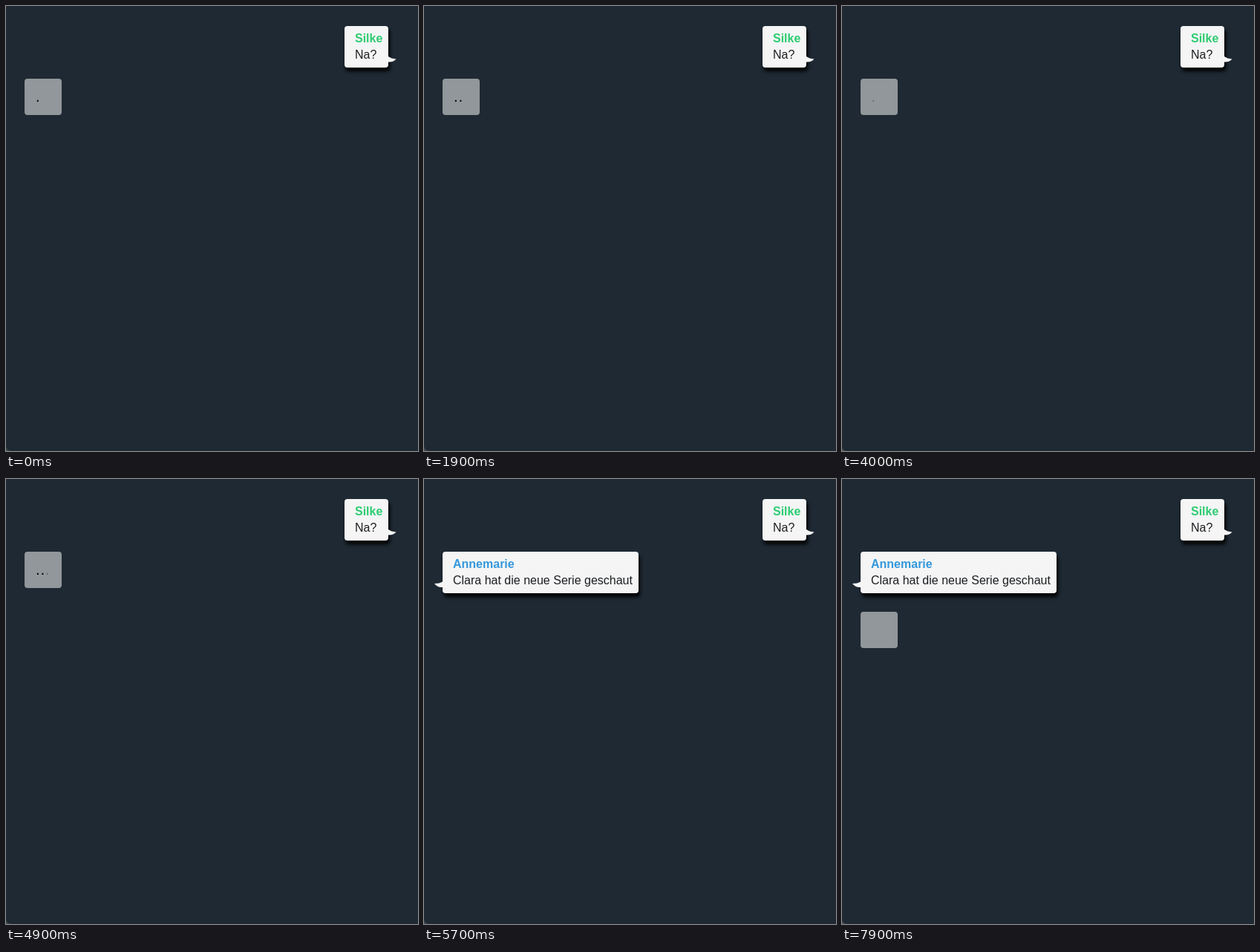
These frames come from a looping animation (555 px wide and 600 px high, 8 s). An HTML page:

```html
<!DOCTYPE html>
<html lang="de">
<meta charset="utf-8">
<title>Chat</title>
<style>
  html, body { margin: 0; width: 100%; height: 100%; overflow: hidden; background: #1e2933; }
  svg { display: block; font: 16px "Liberation Sans", Arial, sans-serif; }
  .box { fill: #f5f5f5; filter: drop-shadow(2px 5px 2.5px #000); }
  .tail { fill: #f5f5f5; }
  .name { font-weight: bold; }
  .text { fill: #1c1e21; }
  .dots { font-size: 20.8px; }
</style>
<svg width="555" height="600" viewBox="0 0 555 600">
  <clipPath id="clip"><rect id="reveal" x="13.6" width="0" height="49"/></clipPath>
  <path d="M0 592Q0 600 8 600H0Z" fill="#41484e"/>

  <g transform="translate(456 27)">
    <rect class="box" width="59" height="56" rx="4"/>
    <path class="tail" d="M59 41Q63 44 69.5 44.5Q66 49 59 48.5Z"/>
    <text class="name" x="14" y="22" fill="#2ecc71">Silke</text>
    <text class="text" x="14" y="44">Na?</text>
  </g>

  <g id="reply" transform="translate(25 98)">
    <rect class="box" width="264" height="56" rx="4"/>
    <path class="tail" d="M0 40.5Q-4 43 -11 43Q-7 48.5 0 48Z"/>
    <text class="name" x="14" y="22" fill="#3498db">Annemarie</text>
    <text class="text" x="14" y="44">Clara hat die neue Serie geschaut</text>
  </g>

  <g id="typing">
    <rect width="50" height="49" rx="4" fill="#91979a"/>
    <text class="dots" x="14" y="31" clip-path="url(#clip)">…</text>
  </g>
</svg>
<script>
  const LOOP = 8000, STEP = 100, SENT = 5700, NEXT = 7600, PERIOD = 1370;
  const [reply, typing, reveal] = ["reply", "typing", "reveal"].map(id => document.getElementById(id));
  const show = (el, on) => el.setAttribute("visibility", on ? "visible" : "hidden");

  function draw(now) {
    const t = Math.floor(now % LOOP / STEP) * STEP;
    const sent = t >= SENT;
    const phase = (t + (sent ? 412 : 362)) % PERIOD / PERIOD;
    show(reply, sent);
    show(typing, !sent || t >= NEXT);
    typing.setAttribute("transform", `translate(25 ${sent ? 179 : 98})`);
    reveal.setAttribute("width", 20 * phase);
    requestAnimationFrame(draw);
  }
  draw(performance.now());
</script>
</html>
```
